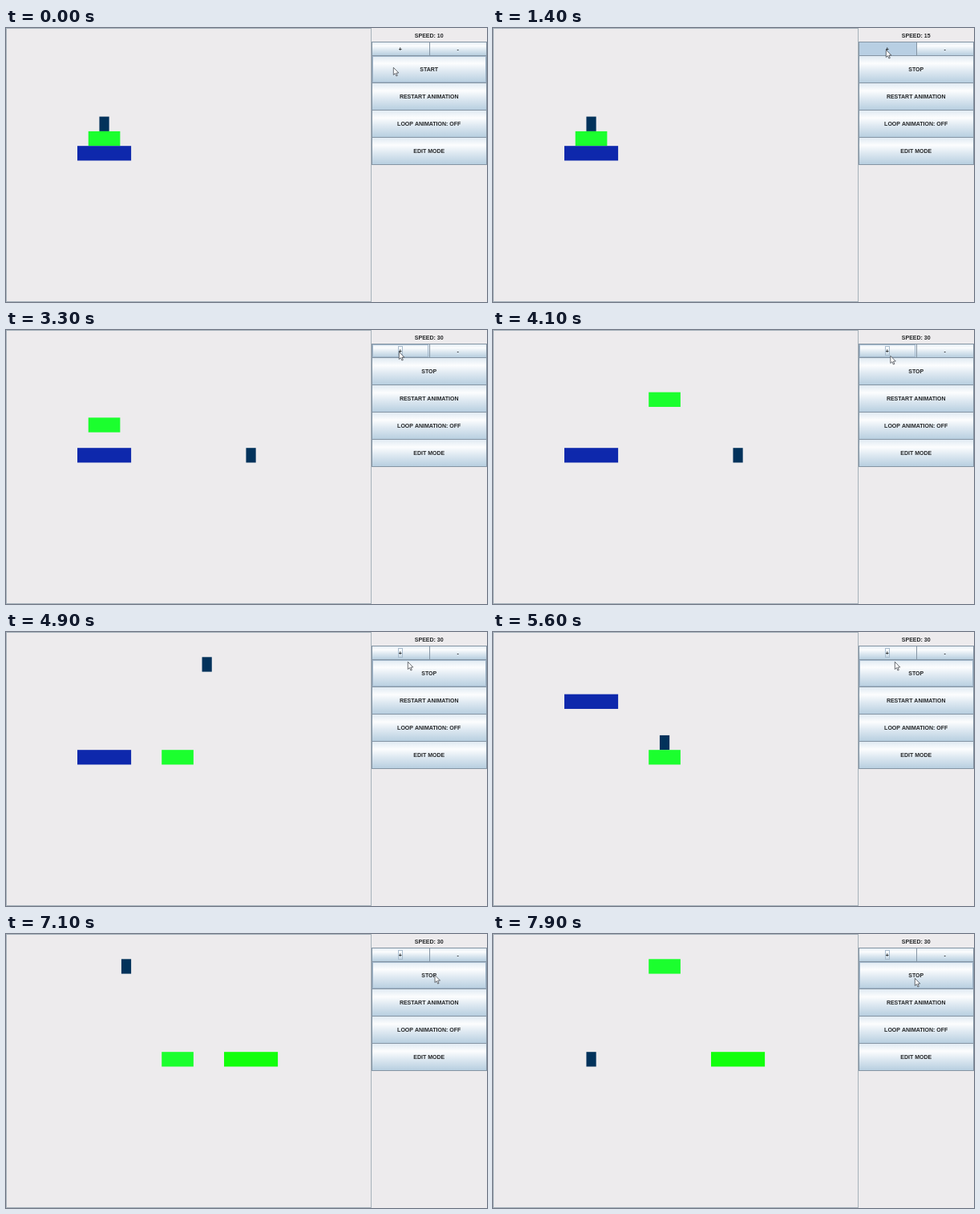
Recreate the animation shown at these times as an HTML page with a canvas. Size 600 by 342 pixels, loop 8000 ms.

```html
<!DOCTYPE html>
<html lang="en">
<head>
<meta charset="utf-8">
<title>Tower animation player</title>
<style>
  html, body { margin: 0; width: 100%; height: 100%; overflow: hidden; background: #edebed; }
  canvas { display: block; width: 600px; height: 342px; }
</style>
</head>
<body>
<canvas id="stage" width="600" height="342"></canvas>
<script>
const ctx = document.getElementById('stage').getContext('2d');
const LOOP = 8000;

// Start click, then four evenly spaced clicks on "+", each adding 5 to the speed
const START_AT = 630, FIRST_CLICK = 1240, CLICK_GAP = 290, CLICKS = 4;
const PRESS = 150, TOP_RATE = 29.5;

// Scene units
const SCALE = 0.61, PEG = 150, FLOOR = 240, LIFT = 50, THICK = 30;
// Ticks
const FIRST_MOVE = 25, MOVE = 32, STEP = 10, FADE = 8;
const DONE_COLOR = [18, 255, 12];

const DISKS = [
  { w: 20, color: [2, 50, 91] },
  { w: 65, color: [27, 255, 46] },
  { w: 110, color: [14, 40, 172] }
];

// Pointer tip: ms, x, y
const POINTER = [
  [0, 483, 49], [START_AT, 483, 49], [880, 490, 27], [3750, 490, 27], [4450, 501, 37],
  [5620, 501, 37], [6000, 508, -16], [6400, 620, -16], [6700, 606, 19], [7150, 526, 55], [LOOP, 526, 55]
];

const BUTTONS = ['+', '-'].map((label, i) => ({ label, x: 456 + 72 * i, y: 17, w: 72, h: 17 }))
  .concat(['START', 'RESTART ANIMATION', 'LOOP ANIMATION: OFF', 'EDIT MODE']
    .map((label, i) => ({ label, x: 456, y: 34 + 34 * i, w: 144, h: 34 })));

const clamp = (v, lo = 0, hi = 1) => Math.max(lo, Math.min(hi, v));
const mix = (a, b, k) => a + (b - a) * k;

// Classic recursive solution: [disk, from peg, to peg]
function solve(n, from, to, via) {
  return n < 0 ? [] : [...solve(n - 1, from, via, to), [n, from, to], ...solve(n - 1, via, to, from)];
}

// Give every disk its resting place and its timed moves
function plan() {
  const stack = [DISKS.length, 0, 0];
  const top = peg => FLOOR - THICK * stack[peg];
  DISKS.forEach((d, i) => {
    d.y = FLOOR - THICK * (DISKS.length - 1 - i);
    d.moves = [];
  });
  solve(DISKS.length - 1, 0, 2, 1).forEach(([n, from, to], i) => {
    const start = FIRST_MOVE + MOVE * i;
    stack[from]--;
    DISKS[n].moves.push({ start, shift: to - from, land: top(to) });
    DISKS[n].done = start + MOVE;
    stack[to]++;
  });
}

const clicksAt = t => clamp(Math.floor((t - FIRST_CLICK) / CLICK_GAP) + 1, 0, CLICKS);

function tickAt(t) {
  let tick = 1, from = START_AT;
  for (let i = 0; i <= CLICKS; i++) {
    const end = i < CLICKS ? FIRST_CLICK + CLICK_GAP * i : LOOP;
    tick += clamp(t - from, 0, end - from) * Math.min(10 + 5 * i, TOP_RATE) / 1000;
    from = end;
  }
  return Math.floor(tick);
}

function isPressed(label, t) {
  if (label === 'START') return t >= START_AT - PRESS && t < START_AT;
  const next = FIRST_CLICK + CLICK_GAP * clicksAt(t);
  return label === '+' && clicksAt(t) < CLICKS && t >= next - PRESS;
}

function pointerAt(t) {
  const i = Math.max(1, POINTER.findIndex(p => p[0] >= t));
  const [t0, x0, y0] = POINTER[i - 1], [t1, x1, y1] = POINTER[i];
  const k = (t - t0) / (t1 - t0);
  return [mix(x0, x1, k), mix(y0, y1, k)];
}

// A move lifts, slides and drops
function drawDisk(disk, tick) {
  let x = 200 - disk.w / 2, y = disk.y;
  for (const { start, shift, land } of disk.moves) {
    const part = n => clamp((tick - start - (STEP + 1) * n) / STEP);
    x += shift * PEG * part(1);
    y = mix(mix(y, LIFT, part(0)), land, part(2));
  }
  const fade = clamp((tick - disk.done) / FADE);
  ctx.fillStyle = `rgb(${disk.color.map((c, i) => Math.round(mix(c, DONE_COLOR[i], fade)))})`;
  ctx.fillRect(89 + (x - 145) * SCALE, 31.3 + (y - LIFT) * SCALE, disk.w * SCALE, THICK * SCALE);
}

function text(str, x, y) {
  ctx.font = 'bold 7px "Liberation Sans", Arial, sans-serif';
  ctx.textAlign = 'center';
  ctx.fillStyle = '#242628';
  ctx.fillText(str, x, y);
}

function frame(x, y, w, h, color) {
  ctx.strokeStyle = color;
  ctx.lineWidth = 1;
  ctx.strokeRect(x + 0.5, y + 0.5, w - 1, h - 1);
}

function drawButton({ x, y, w, h }, label, hover, pressed, focus) {
  const g = ctx.createLinearGradient(0, y, 0, y + h);
  ['#dde8f1', '#fcfdfe', '#dde8f1', '#b8cfe0'].forEach((c, i) => g.addColorStop(i ? 0.3 * i + (i === 3) * 0.1 : 0, c));
  ctx.fillStyle = pressed ? '#b8cfe3' : g;
  ctx.fillRect(x, y, w, h);
  if (hover && !pressed) frame(x + 1, y + 1, w - 2, h - 1, '#a3b8cc');
  // Neighbours share an edge
  frame(x, y, Math.min(w + 1, 600 - x), h + 1, '#8595a4');
  if (focus) frame(x + w / 2 - 3, y + 3, 6, 12, '#a9bccd');
  text(label, x + w / 2 - 0.3, y + h / 2 + 3.4);
}

function drawPointer(x, y) {
  ctx.save();
  ctx.translate(x + 0.3, y + 0.3);
  const shape = new Path2D('M0 0V9.2L2.1 7.3 3.6 10.7 5 10.1 3.6 6.8 6.5 6.7Z');
  ctx.fillStyle = '#fff';
  ctx.fill(shape);
  ctx.strokeStyle = '#30343c';
  ctx.lineWidth = 0.7;
  ctx.stroke(shape);
  ctx.restore();
}

function draw(t) {
  const [mx, my] = pointerAt(t);
  const tick = tickAt(t), clicks = clicksAt(t);

  ctx.fillStyle = '#edebed';
  ctx.fillRect(0, 0, 600, 342);
  frame(0, 0, 456, 342, '#a6b1ba');
  DISKS.forEach(d => drawDisk(d, tick));

  text('SPEED: ' + (10 + 5 * clicks), 527.7, 11.7);
  for (const b of BUTTONS) {
    const hover = mx >= b.x && mx < b.x + b.w && my >= b.y && my < b.y + b.h;
    const pressed = isPressed(b.label, t);
    const label = b.label === 'START' && t >= START_AT ? 'STOP' : b.label;
    drawButton(b, label, hover, pressed, b.label === '+' && clicks > 0 && !pressed);
  }
  drawPointer(mx, my);
}

plan();
const begin = performance.now();
function loop() {
  draw((performance.now() - begin) % LOOP);
  requestAnimationFrame(loop);
}
loop();
</script>
</body>
</html>
```
